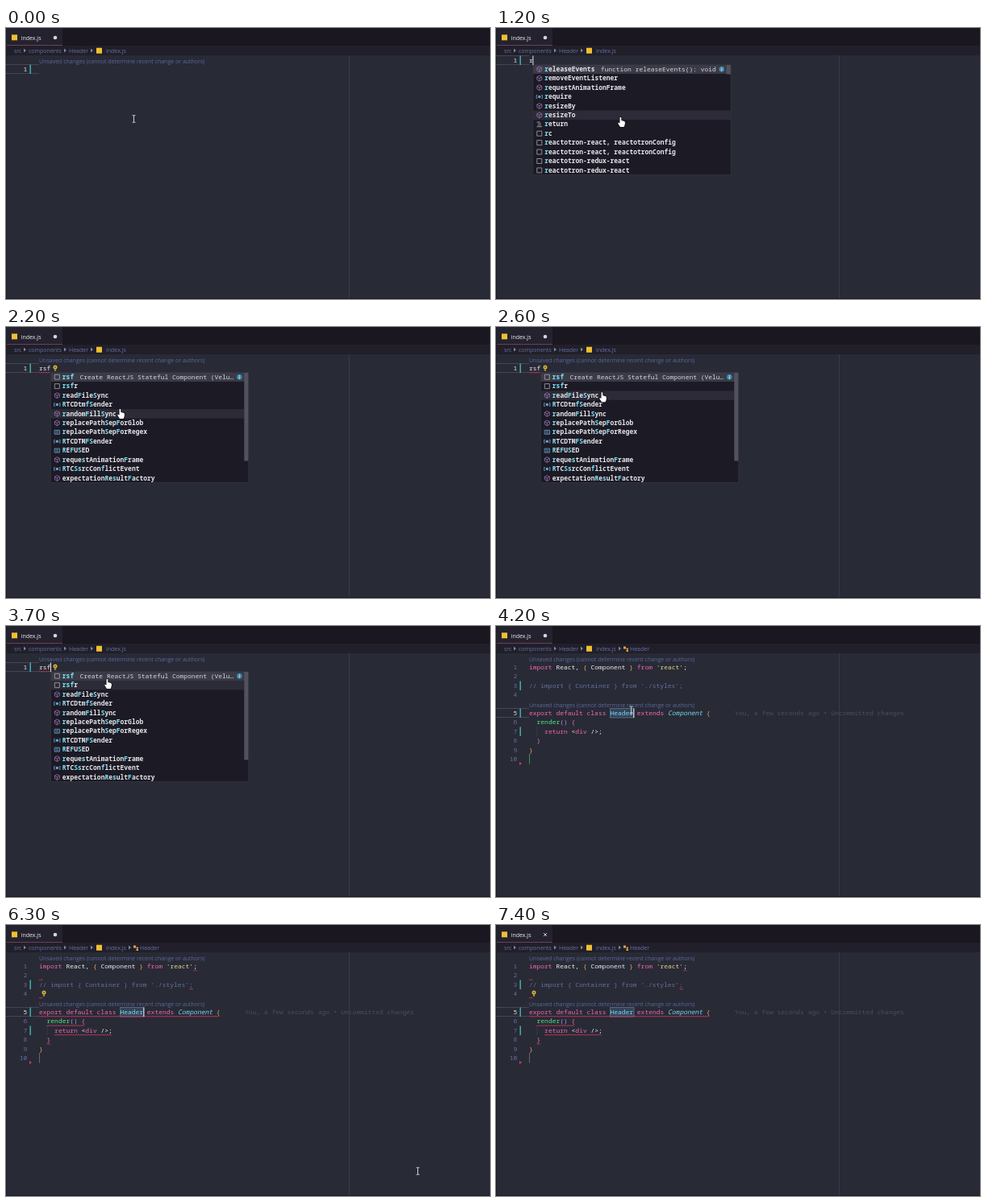
Write an HTML page with a canvas that moves like this. It is 600 px wide and 337 px high and loops after 7500 ms.

```html
<!DOCTYPE html>
<html lang="en">
<head>
<meta charset="utf-8">
<title>Snippet demo</title>
<style>
html, body { margin: 0; width: 100%; height: 100%; overflow: hidden; background: #282a36; }
canvas { display: block; }
</style>
</head>
<body>
<canvas id="stage" width="600" height="337"></canvas>
<script>
const ctx = document.getElementById('stage').getContext('2d');
const LOOP = 7500, CHAR = 4.78, ROW = 11.43, LEFT = 41;
const FACE = '7.96px "Noto Sans Mono", "DejaVu Sans Mono", monospace';
const MONO = '500 ' + FACE, STRONG = '600 ' + FACE;
const UI = '7px "Open Sans", "Noto Sans", sans-serif';
const C = {
  p: '#f268ae', w: '#eeeef0', y: '#e6d684', o: '#e3ac5a', c: '#78d9ec',
  g: '#55e47d', n: '#64709c', v: '#b58de8', red: '#d23a5e',
  method: '#9a78b4', field: '#6aa5cc', plain: '#a9a9b0'
};

// A ^ marks a letter that matches the typed text.
const LISTS = {
  r: [
    'm^releaseEvents', 'm^removeEventListener', 'm^requestAnimationFrame', 'v^require',
    'm^resizeBy', 'm^resizeTo', 'k^return', 's^rc', 's^reactotron-react, reactotronConfig',
    's^reactotron-react, reactotronConfig', 's^reactotron-redux-react', 's^reactotron-redux-react'
  ],
  rs: [
    's^r^sf', 's^r^sfr', 'm^re^sizeBy', 'm^re^sizeTo', 'm^readFile^Sync', 'v^RTCDtmf^Sender',
    'm^randomFill^Sync', 'm^replacePath^SepForGlob', 'c^replacePath^SepForRegex',
    'v^RTCDTMF^Sender', 'c^REFU^SED', 'm^reque^stAnimationFrame'
  ],
  rsf: [
    's^r^s^f', 's^r^s^fr', 'm^read^File^Sync', 'v^RTCDtm^f^Sender', 'm^random^Fill^Sync',
    'm^replacePath^Sep^ForGlob', 'c^replacePath^Sep^ForRegex', 'v^RTCDTM^F^Sender',
    'c^RE^FU^SED', 'm^reque^stAnimation^Frame', 'v^RTC^S^srcCon^flictEvent',
    'mexpectation^Re^sult^Factory'
  ]
};
const SNIPPET = 'Create ReactJS Stateful Component (Velu…';
const DETAIL = { r: 'function releaseEvents(): void', rs: SNIPPET, rsf: SNIPPET };
const THUMB = { r: 12, rs: 45, rsf: 110 };

// Each line: centre y, indent, then pairs of colour and text.
const CODE = [
  [51, 0, 'p', 'import', 'w', ' React, ', 'o', '{', 'w', ' Component ', 'o', '}', 'p', ' from ', 'y', "'react'", 'w', ';'],
  [62.5, 0],
  [74, 0, 'n', "// import { Container } from './styles';"],
  [85, 0],
  [108, 0, 'p', 'export default class ', 'c', 'Header', 'p', ' extends ', 'ci', 'Component', 'o', ' {'],
  [119.5, 2, 'g', 'render', 'v', '()', 'p', ' {'],
  [131, 4, 'p', 'return ', 'w', '<', 'p', 'div ', 'w', '/>;'],
  [142.3, 2, 'p', '}'],
  [153.8, 0, 'o', '}'],
  [165.2, 0]
];
// Row centre, first column, column count.
const ERRORS = [[51, 40, 1], [62.5, 0, 1], [74, 39, 1], [85, 0, 1], [108, 0, 47], [119.5, 2, 10], [131, 4, 15], [142.3, 2, 1]];

const MOUSE = [
  [0, 158, 113], [900, 158, 113], [1000, 156, 115], [1200, 155, 116], [1500, 155, 116],
  [1800, 142, 107], [2200, 142, 107], [2800, 127, 76], [3300, 126, 71], [3900, 126, 71],
  [4600, 222, 149], [5900, 222, 149], [6300, 510, 306], [6400, 525, 317]
];

function rect(x, y, w, h, color) {
  ctx.fillStyle = color;
  ctx.fillRect(x, y, w, h);
}

function frame(x, y, w, h, color) {
  ctx.strokeStyle = color;
  ctx.lineWidth = 1;
  ctx.strokeRect(x, y, w, h);
}

function path(points, color, width = 0.9, close = false) {
  ctx.beginPath();
  points.forEach(([x, y]) => ctx.lineTo(x, y));
  if (close) ctx.closePath();
  ctx.strokeStyle = color;
  ctx.lineWidth = width;
  ctx.stroke();
}

function disc(x, y, r, color) {
  ctx.beginPath();
  ctx.arc(x, y, r, 0, 7);
  ctx.fillStyle = color;
  ctx.fill();
}

function text(s, x, y, color, font = MONO) {
  ctx.font = font;
  ctx.fillStyle = color;
  ctx.fillText(s, x, y + 2.7);
}

function squiggle(y, col, count) {
  const points = [];
  for (let x = 0; x <= count * CHAR; x += 1.5) points.push([LEFT + col * CHAR + x, y + 5.6 + (x / 1.5 % 2 ? 0.6 : -0.6)]);
  path(points, C.red, 0.9);
}

function bulb(x, y) {
  disc(x, y - 1, 2.5, '#d9b52f');
  rect(x - 1.1, y + 1.4, 2.2, 2.3, '#b3963a');
  disc(x, y - 1, 0.9, '#5b5030');
}

function lens(y) {
  text('Unsaved changes (cannot determine recent change or authors)', LEFT, y, '#5c699a', UI);
}

function caret(x, y) {
  rect(x, y - 5.5, 1, 11.5, '#e8e8ea');
}

function lineNumber(n, y, active) {
  ctx.textAlign = 'right';
  text(n, 26.3, y, active ? '#e8e8ec' : C.n);
  ctx.textAlign = 'left';
  if (active) for (const dy of [-5.5, 5.5]) path([[0, y + dy], [LEFT, y + dy]], '#444654', 1);
}

function gutterBar(y) {
  rect(29.5, y - 5.5, 1.4, 11.5, '#45b5b8');
}

function chrome(coded, saved) {
  rect(0, 0, 600, 337, '#282a36');
  rect(0, 0, 600, 22, '#1a1720');
  rect(0, 0, 70, 22, '#24222e');
  rect(0, 21, 70, 1, '#6a3f58');
  rect(0, 22, 600, 12, '#211f2a');
  rect(425, 34, 1, 303, '#383a47');
  rect(0, 0, 1, 337, '#1d1b25');
  rect(0, 336, 600, 1, '#1d1b25');
  rect(7, 8.3, 7, 7, '#f0c030');
  text('index.js', 18.7, 12.2, '#f0f0f2', UI);
  if (saved) {
    path([[59, 10], [63, 14]], '#e0e0e4');
    path([[63, 10], [59, 14]], '#e0e0e4');
  } else disc(61, 12, 2.3, '#d5d5da');

  const crumbs = [['src', 10], ['components', 28], ['Header', 78], ['index.js', 124]];
  const arrows = [23, 73, 106];
  if (coded) {
    crumbs.push(['Header', 166]);
    arrows.push(153);
    rect(158, 25.5, 3, 3, '#dfa04e');
    rect(161.5, 27.5, 2.5, 2, '#dfa04e');
    rect(161.5, 30, 2.5, 2, '#dfa04e');
  }
  crumbs.forEach(([s, x]) => text(s, x, 28, '#6572a2', UI));
  ctx.fillStyle = '#8085a0';
  for (const x of arrows) {
    ctx.beginPath();
    ctx.moveTo(x - 1, 25.5);
    ctx.lineTo(x + 2, 28);
    ctx.lineTo(x - 1, 30.5);
    ctx.fill();
  }
  rect(112, 24.7, 7, 7, '#f0c030');
}

function itemIcon(kind, x, y) {
  if (kind === 'm') {
    const hex = [0, 1, 2, 3, 4, 5].map(i => [x + 3.4 * Math.sin(i * Math.PI / 3), y - 3.4 * Math.cos(i * Math.PI / 3)]);
    path(hex, C.method, 0.8, true);
    path([hex[5], [x, y], hex[1]], C.method, 0.8);
    path([[x, y], hex[3]], C.method, 0.8);
  } else if (kind === 'v') {
    for (const side of [-1, 1]) {
      path([[2.6, -2], [3.6, -2], [3.6, 2], [2.6, 2]].map(([a, b]) => [x + side * a, y + b]), C.field);
    }
    disc(x, y, 1.7, C.field);
  } else if (kind === 's') {
    path([[x - 3, y - 3], [x + 3, y - 3], [x + 3, y + 3], [x - 3, y + 3]], C.plain, 0.8, true);
  } else {
    const color = kind === 'c' ? C.field : C.plain;
    if (kind === 'c') path([[x - 3.2, y - 2.5], [x + 3.2, y - 2.5], [x + 3.2, y + 2.5], [x - 3.2, y + 2.5]], color, 0.8, true);
    else path([[x - 3.2, y - 2.8], [x + 1, y - 2.8]], color);
    path([[x - 2, y - 0.9], [x + 2, y - 0.9]], color, 0.8);
    path([[x - 2, y + 1.1], [x + 2, y + 1.1]], color, 0.8);
    if (kind === 'k') path([[x - 3.2, y + 2.9], [x + 3.2, y + 2.9]], color);
  }
}

function popup(typed, top, mouseY) {
  const x = LEFT + typed.length * CHAR, rows = LISTS[typed];
  const hover = Math.floor((mouseY - 3 - top) / ROW);
  rect(x, top, 245.5, rows.length * ROW, '#1c1a25');
  if (hover > 0) rect(x, top + hover * ROW, 245.5, ROW, '#2c2b37');
  rect(x, top, 245.5, ROW, '#3b3b48');
  rows.forEach((item, i) => {
    const y = top + (i + 0.5) * ROW;
    let pen = x + 14.5, hit = false;
    itemIcon(item[0], x + 8, y);
    for (const ch of item.slice(1)) {
      if (ch === '^') { hit = true; continue; }
      text(ch, pen, y, hit ? '#7be3f8' : '#e6e6ea', STRONG);
      hit = false;
      pen += CHAR;
    }
    if (i === 0) text(DETAIL[typed], pen + 7.3, y, '#d6d6dc');
  });
  disc(x + 234, top + 5.8, 3.2, '#3a8fb0');
  rect(x + 233.5, top + 5, 1, 3, '#d5e6ec');
  rect(x + 233.5, top + 3.3, 1, 1, '#d5e6ec');
  rect(x + 240, top, 5.5, THUMB[typed], '#52525e');
  frame(x, top, 245.5, rows.length * ROW, '#32313d');
}

function beforeSnippet(t, mouseY) {
  const typed = t < 800 ? '' : t < 1300 ? 'r' : t < 1600 ? 'rs' : 'rsf';
  const shifted = typed === 'r', y = shifted ? 40 : 51;
  if (!shifted) lens(41);
  lineNumber(1, y, true);
  gutterBar(y);
  text(typed, LEFT, y, C.w);
  if (t >= 2000) squiggle(51, 0, 3);
  if (t >= 2200) bulb(61, 51);
  if (t >= 1000) popup(typed, y + 5.5, mouseY);
  const on = t < 800 ? t >= 100 && t < 500 : t < 1700 || (t - 1700) % 1000 < 500;
  if (on) caret(LEFT + typed.length * CHAR - 0.4, y);
}

function afterSnippet(t) {
  lens(41);
  lens(98);
  rect(141, 103, 30, 11, '#35435a');
  frame(141.5, 102.5, 29.5, 11.5, '#52687c');
  path([[51, 125], [51, 137]], '#3c3e4b', 0.8);
  CODE.forEach(([y, indent, ...parts], i) => {
    lineNumber(i + 1, y, i === 4);
    let pen = LEFT + indent * CHAR;
    for (let k = 0; k < parts.length; k += 2) {
      const style = parts[k], s = parts[k + 1];
      text(s, pen, y, C[style[0]], style[1] ? 'italic ' + MONO : MONO);
      pen += s.length * CHAR;
    }
  });
  [74, 108, 131].forEach(gutterBar);
  ctx.fillStyle = C.red;
  ctx.beginPath();
  ctx.moveTo(29, 169);
  ctx.lineTo(32, 171);
  ctx.lineTo(29, 173);
  ctx.fill();
  rect(LEFT, 159, 1, 12.5, t < 5100 ? '#3f8f62' : '#626572');
  if (t >= 4100) text('You, a few seconds ago • Uncommitted changes', 296, 108, '#4b4e60');
  if (t >= 4400) {
    ERRORS.forEach(e => squiggle(...e));
    bulb(47, 85);
  }
  if ((t - 3900) % 1000 < 500) caret(170.3, 108);
}

function mouseAt(t) {
  const i = MOUSE.findIndex(m => m[0] > t);
  if (i < 0) return MOUSE[MOUSE.length - 1].slice(1);
  const [t0, x0, y0] = MOUSE[i - 1], [t1, x1, y1] = MOUSE[i], k = (t - t0) / (t1 - t0);
  return [x0 + (x1 - x0) * k, y0 + (y1 - y0) * k];
}

function pointer(x, y, hand) {
  if (!hand) {
    path([[x + 0.5, y - 4], [x + 0.5, y + 4]], '#d0d0d6', 1);
    for (const dy of [-4.3, 4.3]) path([[x - 1.5, y + dy], [x + 2.5, y + dy]], '#d0d0d6', 0.9);
    return;
  }
  const shape = [[-1.4, -5], [0.2, -5], [0.4, -1], [4.2, 0], [5, 1.5], [4.6, 4.5], [3.6, 7], [-1, 7], [-3.6, 3], [-3.4, 1.6], [-1.5, 2.5]];
  path(shape.map(([a, b]) => [x + a, y + b]), '#15141b', 1.6, true);
  ctx.fillStyle = '#fff';
  ctx.fill();
}

function draw(now) {
  const t = Math.floor(now % LOOP / 100) * 100;
  const [mx, my] = mouseAt(t), coded = t >= 3900;
  chrome(coded, t >= 6600);
  if (coded) afterSnippet(t);
  else beforeSnippet(t, my);
  if (t < 6500) pointer(mx, my, t >= 1000 && !coded);
  requestAnimationFrame(draw);
}
requestAnimationFrame(draw);
</script>
</body>
</html>
```
